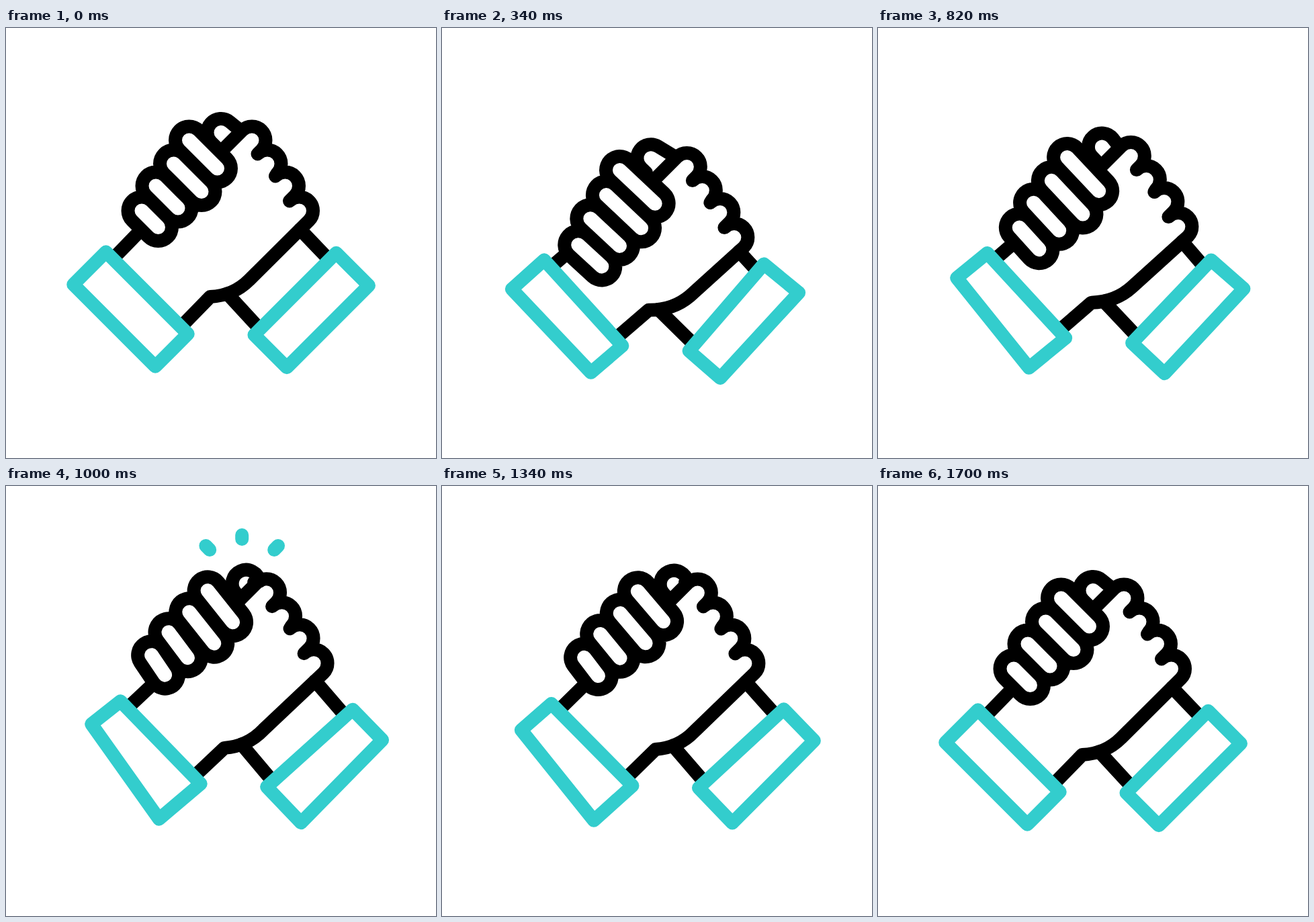
Recreate the animation shown at these times as an HTML page. Size 640 by 640 pixels, loop 2400 ms.

```html
<!DOCTYPE html>
<html lang="en">
<head>
<meta charset="utf-8">
<title>Clasped hands</title>
<style>
  html, body { margin: 0; width: 100%; height: 100%; overflow: hidden; background: #fff; }
  svg { display: block; width: 100vw; height: 100vh; }
  path { fill: none; stroke: #000; stroke-width: 20; stroke-linecap: round; stroke-linejoin: round; }
  .cuff { fill: #fff; }
  .cuff, .sparks { stroke: #33cdcd; }
  .fingers { stroke-width: 61; }
  .gaps { stroke: #fff; stroke-width: 21; }
</style>
</head>
<body>
<svg id="stage" viewBox="0 0 640 640"></svg>
<script>
const LOOP = 2400, STEP = 20;
const DOWN = 560, UP = 1080, BACK = 1700;
// The swing passes a little beyond the low (0) and high (1) poses.
const LOWEST = -0.116, HIGHEST = 1.08;

const R = 20.5, DIAG = R * Math.SQRT1_2;
const KNUCKLES = [[366, 167], [389, 202], [415.5, 235], [436.5, 272]];
const REACH = [42, 41.5, 33, 24.5];
const MIRROR = 638.5;
const PALM = [[362, 375], [346, 391], [326, 399], [304, 400]];
const THUMB = [320, 155.5];
const WRIST = 0.83;

const add = (a, b, k = 1) => a.map((v, i) => v + b[i] * k);
const lerp = (a, b, k) => add(a, add(b, a, -1), k);
const line = (...pts) => 'M' + pts.join('L');

function ramp(t, a, b) {
  const x = Math.min(1, Math.max(0, (t - a) / (b - a)));
  return x * x * (3 - 2 * x);
}

function bezier(p, k) {
  while (p.length > 1) p = p.slice(1).map((q, i) => lerp(p[i], q, k));
  return p[0];
}

// Shares of the low and high poses; the remainder is the rest pose.
function shares(t) {
  const mix = (s, g) => [s * (1 - g), s * g];
  if (t < DOWN) return mix(ramp(t, 0, DOWN), LOWEST);
  if (t < UP) return mix(1, LOWEST + (HIGHEST - LOWEST) * ramp(t, DOWN, UP));
  return mix(1 - ramp(t, UP, BACK), HIGHEST);
}

const shift = ([a, b], low, high) => low.map((v, i) => v * a + high[i] * b);

const paths = {};
for (const name of ['wrists', 'thumb', 'fist', 'fingers', 'gaps', 'cuff', 'sparks']) {
  paths[name] = document.createElementNS('http://www.w3.org/2000/svg', 'path');
  paths[name].setAttribute('class', name);
  document.getElementById('stage').appendChild(paths[name]);
}
const set = (name, d) => paths[name].setAttribute('d', d);

// A slanted box that moves, leans along its length, tilts across and tapers.
// Returns its point at u along the length and v across, both from -1 to 1.
function cuff(side, center, w, low, high) {
  const [move, lean, tilt, taper] = low.map((v, i) => shift(w, v, high[i]));
  const mid = add(center, move);
  const along = add([61 * side, 61], lean);
  const across = add([24.25 * side, -24.25], tilt);
  return (u, v) => add(add(add(mid, along, u), across, v), taper, u * v);
}

const cuffBox = at => line(at(-1, -1), at(-1, 1), at(1, 1), at(1, -1)) + 'Z';

function leftFingers(w) {
  const move = shift(w, [-8, 59.5], [27.5, -11]);
  const fan = shift(w, [3.5, 2.5], [-4.3, -3]);
  const stretch = shift(w, [14, 11], [-4.5, 5]);
  return KNUCKLES.map(([x, y], i) => {
    const root = add(add([MIRROR - x, y], move), fan, i);
    return [root, add(add(root, [REACH[i], REACH[i]]), stretch)];
  });
}

// Runs beside the first finger, round the tip and on towards the knuckle.
function thumbPath(w, [root, tip], knuckle) {
  const c = add(THUMB, shift(w, [-8.5, 51], [37, -10]));
  const on = a => [c[0] + R * Math.cos(a), c[1] + R * Math.sin(a)];
  const slope = Math.atan2(tip[1] - root[1], tip[0] - root[0]);
  const goal = add(knuckle, [-4, -1]);
  const [gx, gy] = add(goal, c, -1);
  const from = slope + Math.PI / 2;
  const to = Math.atan2(gy, gx) - Math.acos(Math.min(1, R / Math.hypot(gx, gy)));
  const large = to + 2 * Math.PI - from > Math.PI ? 1 : 0;
  const base = add(on(from), [Math.cos(slope), Math.sin(slope)], 10);
  return `${line(base, on(from))}A${R} ${R} 0 ${large} 1 ${on(to)}L${goal}`;
}

function drawHands(w) {
  const left = cuff(1, [185.5, 418.5], w,
    [[3.2, 14], [-4, 3.2], [-0.5, 5], [0, 0.7]],
    [[18.2, -15], [-6, 5], [2, 2.6], [4.7, -4.6]]);
  const right = cuff(-1, [454.7, 420], w,
    [[-7, 22.2], [5.2, 4], [-0.5, 4.7], [1.7, 0.5]],
    [[21, -5], [-1.2, -1.4], [0.5, -0.4], [-1.7, -2]]);
  set('cuff', cuffBox(left) + cuffBox(right));

  const fingers = leftFingers(w);
  const capsules = fingers.map(f => line(...f)).join('');
  set('fingers', capsules);
  set('gaps', capsules);

  const move = shift(w, [0, 53], [21.5, -8]);
  const arcs = KNUCKLES.map(k => [-DIAG, DIAG].map(d => add(add(k, move), [d, d])));
  const first = arcs[0][0], last = arcs[3][1];
  const heel = shift(w, [12, 31], [21, -12]), corner = shift(w, [7, 26], [21, -10]);
  const palm = PALM.map((p, i) => add(p, lerp(heel, corner, i / 3)));
  const palmEnd = left(WRIST, 1);
  set('fist', line(add(first, [-29.5, 29.5])) +
    arcs.map(([a, b]) => `L${a}A${R} ${R} 0 0 1 ${b}`).join('') +
    `L${palm[0]}C${palm.slice(1).join(' ')}L${palmEnd}`);
  set('thumb', thumbPath(w, fingers[0], first));

  // Forearm edges: one parallel to the palm's end, two leaving the fist.
  const [upper, lower] = add([0.15, 0.6], shift(w, [-0.085, 0.25], [-0.01, 0]));
  const sleeve = left(-WRIST, 1);
  set('wrists', line(sleeve, add(sleeve, add(palm[3], palmEnd, -1))) +
    line(lerp(last, palm[0], upper), right(-WRIST, 1)) +
    line(bezier(palm, lower), right(WRIST + 0.03, 1)));
}

function drawSparks(t) {
  const head = ramp(t, 940, 1140), tail = ramp(t, 1060, 1260);
  const spark = i => {
    const at = k => [351.2 + i * (48 + 27 * k), 79 + 16 * Math.abs(i) - 28 * k];
    return line(at(tail), at(head));
  };
  set('sparks', head > tail ? [-1, 0, 1].map(spark).join('') : '');
}

const start = performance.now();
function draw(now) {
  const t = Math.floor((Math.max(0, now - start) % LOOP) / STEP) * STEP;
  drawHands(shares(t));
  drawSparks(t);
  requestAnimationFrame(draw);
}
draw(start);
</script>
</body>
</html>
```
